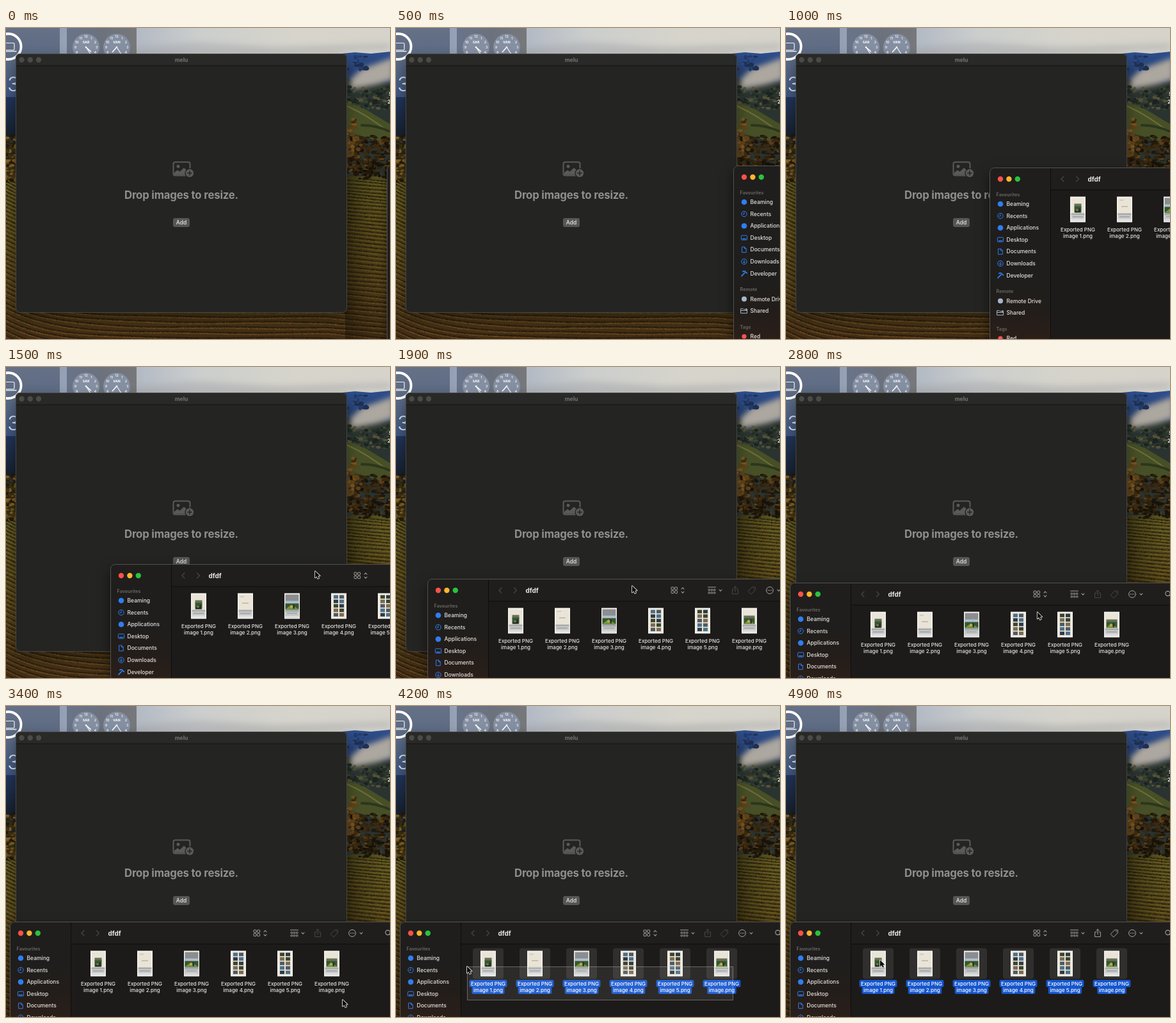
An HTML page with a canvas that plays this animation: 600x486 px, repeating every 5 s.

```html
<!DOCTYPE html>
<html lang="en">
<head>
<meta charset="utf-8">
<title>Image resizer</title>
<style>
  html, body { margin: 0; width: 100%; height: 100%; overflow: hidden; background: #242422; }
  canvas { display: block; width: 600px; height: 486px; }
</style>
</head>
<body>
<canvas id="stage" width="600" height="486"></canvas>
<script>
const W = 600, H = 486, LOOP = 5000, STEP = 100;
const FONT = 'Inter, "Liberation Sans", sans-serif';
const BLUE = '#2f7df5';
let g = document.getElementById('stage').getContext('2d');

let seed = 7;
const rnd = () => (seed = (seed * 16807) % 2147483647) / 2147483647;
const range = (a, b) => a + rnd() * (b - a);

function rect(x, y, w, h, r, fill, stroke, lw = 1) {
  g.beginPath();
  g.roundRect(x, y, w, h, r);
  if (fill) { g.fillStyle = fill; g.fill(); }
  if (stroke) { g.strokeStyle = stroke; g.lineWidth = lw; g.stroke(); }
}

function disc(x, y, r, fill, stroke, lw = 1) {
  g.beginPath();
  g.arc(x, y, r, 0, 7);
  if (fill) { g.fillStyle = fill; g.fill(); }
  if (stroke) { g.strokeStyle = stroke; g.lineWidth = lw; g.stroke(); }
}

function poly(pts, fill) {
  g.beginPath();
  pts.forEach(([x, y]) => g.lineTo(x, y));
  g.closePath();
  g.fillStyle = fill;
  g.fill();
}

function line(path, color, lw = 1, x = 0, y = 0) {
  g.save();
  g.translate(x, y);
  g.strokeStyle = color;
  g.lineWidth = lw;
  g.lineCap = g.lineJoin = 'round';
  g.stroke(new Path2D(path));
  g.restore();
}

function text(s, x, y, size, weight, color, align = 'left', spacing = 0) {
  g.font = `${weight} ${size}px ${FONT}`;
  g.textAlign = align;
  g.textBaseline = 'alphabetic';
  g.letterSpacing = spacing + 'px';
  g.fillStyle = color;
  g.fillText(s, x, y + size * 0.36);
}

function fade(x0, y0, x1, y1, ...stops) {
  const f = g.createLinearGradient(x0, y0, x1, y1);
  stops.forEach((c, i) => f.addColorStop(i / (stops.length - 1), c));
  return f;
}

// Monotone cubic through keys of the form [time, x, y]
function track(keys, t) {
  const last = keys.length - 1;
  if (t >= keys[last][0]) return keys[last].slice(1);
  let i = 0;
  while (t >= keys[i + 1][0]) i++;
  const slope = (k, c) => k < 0 || k >= last ? 0
    : (keys[k + 1][c] - keys[k][c]) / (keys[k + 1][0] - keys[k][0]);
  const tangent = (k, c) => {
    const a = slope(k - 1, c), b = slope(k, c);
    return a * b > 0 ? 2 * a * b / (a + b) : 0;
  };
  const d = keys[i + 1][0] - keys[i][0], u = (t - keys[i][0]) / d;
  return [1, 2].map(c =>
    keys[i][c] * (1 + 2 * u) * (1 - u) ** 2 + keys[i + 1][c] * u * u * (3 - 2 * u)
    + d * (tangent(i, c) * u * (1 - u) ** 2 + tangent(i + 1, c) * u * u * (u - 1)));
}

// ---- Desktop ----
function blobs(n, x0, y0, x1, y1, r, colors) {
  for (let i = 0; i < n; i++) {
    g.beginPath();
    g.ellipse(range(x0, x1), range(y0, y1), range(r / 2, r), range(r / 3, r * .7), 0, 0, 7);
    g.fillStyle = colors[Math.floor(rnd() * colors.length)];
    g.fill();
  }
}

function vineyard() {
  g.fillStyle = fade(0, 232, 0, H, '#57511f', '#554819', '#4e3c18', '#412c14');
  g.fillRect(0, 232, W, H - 232);
  for (let y = 200; y < H + 30; y += 4.6 + (y - 200) * .014) {
    const bend = x => y + 38 * (1 - Math.exp(-x / 70)) - 32
      + Math.max(0, x - 500) * .09 + Math.sin(x / 37 + y) * .7;
    for (let x = 0; x < W; x += 2) {
      const ry = bend(x);
      if (ry < 234 || (x > 20 && x < 530 && ry < 438)) continue;
      g.fillStyle = `rgba(28,20,9,${range(.35, .75)})`;
      g.fillRect(x, ry, 2, range(1.6, 2.8));
      const warm = (ry - 234) / 250;
      g.fillStyle = `rgba(${range(104, 146)},${range(98, 122) - warm * 22},38,${range(.3, .75)})`;
      g.fillRect(x, ry + range(2.4, 3.2), 2, 1.6);
    }
  }
  g.fillStyle = fade(530, 0, 585, 0, 'rgba(18,15,6,.45)', 'rgba(18,15,6,0)');
  g.fillRect(530, 232, 70, 254);
}

function mist(pts, color, blur) {
  g.save();
  g.filter = `blur(${blur}px)`;
  poly(pts, color);
  g.restore();
}

function clock(x, name, hour) {
  disc(x, 30, 21, '#8590a3');
  for (let n = 1; n <= 12; n++) {
    const a = n * Math.PI / 6;
    text(String(n), x + 16.6 * Math.sin(a), 30 - 16.6 * Math.cos(a), 5.4, 600, '#f4f5f7', 'center');
  }
  text(name, x, 22, 5.2, 700, '#fff', 'center');
  const hand = (turn, len, lw) =>
    line(`M0 0L${len * Math.sin(turn)} ${-len * Math.cos(turn)}`, '#fff', lw, x, 30);
  hand((hour + .4) * Math.PI / 6, 10, 1.6);
  hand(4.9 * Math.PI / 6, 16, 1.1);
  disc(x, 30, 1.3, '#fff');
}

function desktop() {
  g.fillStyle = fade(0, 0, W, 0, '#7f8ca4', '#a4aebf', '#cccecd', '#d6d4cb', '#d6d3ca');
  g.fillRect(0, 0, W, 240);
  mist([[200, 30], [300, 22], [420, 30], [600, 24], [600, 34], [420, 40], [200, 42]], 'rgba(168,170,174,.5)', 5);

  g.fillStyle = fade(0, 100, 0, 240, '#22375f', '#161f2c', '#3a2c14');
  g.fillRect(0, 90, 20, 150);
  poly([[525, 40], [545, 38], [570, 40], [600, 37], [600, 240], [525, 240]],
    fade(0, 38, 0, 90, '#2d4e8c', '#24385f'));
  poly([[525, 76], [550, 84], [600, 84], [600, 240], [525, 240]], '#2a3330');
  mist([[538, 80], [556, 64], [578, 56], [605, 46], [605, 80], [580, 88], [560, 92], [538, 96]], '#aca79f', 4);
  blobs(25, 533, 42, 565, 66, 5, ['#223a6a', '#2c4a80', '#1f2f50']);
  blobs(100, 533, 92, 602, 126, 4, ['#212b22', '#3a4430', '#565238', '#1a231f']);
  poly([[525, 114], [560, 126], [600, 150], [600, 182], [525, 160]], '#464f26');
  line('M533 122Q565 136 600 164', '#6b6c38', 2);
  line('M556 152Q580 152 600 162', '#2c361c', 4);
  vineyard();
  blobs(260, 530, 168, 604, 229, 4.5, ['#21170a', '#3b2810', '#5e3f17', '#2c230f', '#191208']);
  blobs(60, 530, 142, 552, 205, 4.5, ['#5e4218', '#3b2b12', '#7a5520']);
  blobs(36, 530, 218, 604, 236, 4, ['#171106', '#221a0a']);
  blobs(110, -3, 168, 18, 240, 4, ['#74521b', '#453213', '#846022', '#231a0c', '#36300f']);

  text('S', 598, 103, 8, 600, '#fff');
  text('2', 596, 115, 8, 600, '#fff');

  rect(-40, -30, 124, 138, 12, fade(0, 0, 0, 108, '#667186', '#596983', '#3d547f'));
  disc(3.6, 29, 20, null, '#fff', 3.8);
  rect(-6, 23.5, 19, 11, 1.5, null, '#f1f3f6', 1.2);
  line('M-8 36.5H16', '#f1f3f6', 1.4);
  text('63%', -16.5, 88, 31, 300, '#dde6f3');

  rect(95, -30, 109, 138, 12, fade(95, 0, 204, 0, '#69748a', '#6c727d', '#77787a'));
  clock(125, 'SAR', 4);
  clock(173, 'VAN', 7);
}

// ---- Resizer window ----
function frame(x, y, w, h, fill, shadow) {
  g.save();
  g.shadowColor = `rgba(0,0,0,${shadow})`;
  g.shadowBlur = 20;
  g.shadowOffsetY = 9;
  rect(x, y, w, h, 7, fill);
  g.restore();
}

function resizer() {
  frame(15, 40, 518, 405, '#242422', .35);
  rect(15, 40, 518, 19, [7, 7, 0, 0], '#292927');
  g.fillStyle = '#141413';
  g.fillRect(15, 58.5, 518, 1);
  rect(15.5, 40.5, 517, 404, 7, null, '#454543');
  [24.5, 37.8, 51].forEach(x => disc(x, 49.7, 4.2, '#4a4a49'));
  text('melu', 274, 49.5, 8.6, 700, '#747472', 'center');

  const tone = '#5a5a59';
  rect(261.5, 209.5, 26, 21, 3, null, tone, 2);
  disc(269, 216.3, 2.5, tone);
  poly([[263, 229.5], [263, 226], [268, 222], [271.5, 224.5], [278, 218.5], [286, 225], [286, 229.5]], tone);
  disc(287, 226.8, 7.6, '#242422');
  disc(287, 226.8, 6.2, tone);
  line('M283.8 226.8H290.2M287 223.6V230', '#242422', 1.5);

  text('Drop images to resize.', 274, 261, 16.8, 700, '#8f8f8d', 'center', -.2);
  rect(261, 297, 26, 14, 3.2, '#565655');
  text('Add', 274, 304.1, 8.5, 500, '#e9e9e8', 'center');
}

// ---- File browser ----
const places = [
  ['Beaming', () => disc(0, 0, 4.3, BLUE)],
  ['Recents', () => { disc(0, 0, 4.2, null, BLUE); line('M0 -2.4V.4H-2', BLUE); }],
  ['Applications', () => disc(0, 0, 4.3, BLUE)],
  ['Desktop', () => { rect(-4.6, -3.6, 9.2, 7, 1.2, null, BLUE); rect(-3, 1, 6, 1.4, .5, BLUE); }],
  ['Documents', () => line('M-3 -4.3H.6L3.2 -1.6V4.3H-3ZM.6 -4.3V-1.6H3.2', BLUE)],
  ['Downloads', () => { disc(0, 0, 4.2, null, BLUE); line('M0 -2.2V2M-1.8 .4L0 2.2L1.8 .4', BLUE); }],
  ['Developer', () => { line('M-4 4L1 -1.2', BLUE, 1.7); line('M-2 -3.2Q1 -4.6 2.6 -2L4.4 -.4', BLUE, 1.8); }],
];
const remote = [
  ['Remote Drive', () => disc(0, 0, 4, '#a5b7cb')],
  ['Shared', () => {
    line('M-5 -3.4H-1.6L-.6 -2.4H4.6V3.6H-5ZM-5 -.6H4.6', '#a5b7cb');
    disc(3.4, -2.6, 1.2, '#a5b7cb');
  }],
];

function row([label, icon], y) {
  g.save();
  g.translate(17, y);
  icon();
  g.restore();
  text(label, 26.5, y, 8.5, 500, '#e4e2e0');
}

function thumb(x, y, i) {
  const box = (dx, dy, w, h, c) => { g.fillStyle = c; g.fillRect(x + dx, y + dy, w, h); };
  box(-12, -20, 24, 40, '#f3f3f1');
  box(-10.5, -18, 21, 36, i === 2 ? '#8c8d8f' : '#e9e4d6');
  if (i === 3 || i === 4) {
    const tones = ['#4d5a63', '#2f3b46', '#7c6a54', '#49708f', '#39452e'];
    for (let r = 0; r < 5; r++)
      for (let c = 0; c < 2; c++)
        box(-8 + c * 9, -17 + r * 7, 7, 5.4, tones[(r * 3 + c * 2 + i) % 5]);
    return;
  }
  box(-10.5, 6, 21, 3, '#a8aaab');
  box(-10.5, 9, 21, 6, '#c7c9ca');
  box(-8, 11, 16, 1, '#888b8e');
  box(-10.5, 15, 21, 3, '#dedfdf');
  if (i === 1) {
    box(-5, -5, 10, 1, '#a39d90');
    box(-8, -15, 6, 1, '#bcb6a8');
    return;
  }
  const wide = i === 2 ? 10.5 : i === 5 ? 8.5 : 5.5;
  const top = i === 0 ? -9 : -8;
  box(-wide, top, wide * 2, 5, i === 2 ? '#aebfd0' : '#66705a');
  box(-wide, top + 4, wide * 2, 9, '#36572f');
  poly([[x - wide, y + 5], [x - 1, y - 2], [x + wide, y + 5]], i === 0 ? '#20271d' : '#6f9a3c');
  disc(x - 1, y + 1, 2, i === 0 ? '#6d7b45' : '#d8a13c');
  box(1.5, -2, 2.5, 6, '#26303a');
}

function file(i, picked) {
  const x = 138 + 73 * i, lines = ['Exported PNG', i < 5 ? `image ${i + 1}.png` : 'image.png'];
  if (picked) rect(x - 24, 40.5, 48, 48, 4, '#302f2d');
  thumb(x, 64.5, i);
  lines.forEach((s, k) => {
    const y = 95.7 + k * 10.6;
    if (picked) {
      g.font = `500 8px ${FONT}`;
      g.letterSpacing = '0px';
      const w = g.measureText(s).width + 5;
      rect(x - w / 2, y - 5.6, w, 11.2, 2.5, '#1556ce');
    }
    text(s, x, y, 8, 500, picked ? '#fff' : '#e6e5e3', 'center');
  });
}

function toolbar(active) {
  const on = '#a3a19f', off = '#484745', act = active ? on : off;
  line('M2 -4L-2 0L2 4', off, 1.1, 114, 17);
  line('M-2 -4L2 0L-2 4', off, 1.1, 137.5, 17);
  text('dfdf', 153.5, 17, 10, 700, '#e9e8e6');
  for (const dx of [0, 5.6])
    for (const dy of [0, 5.6]) rect(381 + dx, 12 + dy, 4, 4, .8, null, on);
  line('M-2 -2L0 -4.2L2 -2M-2 2L0 4.2L2 2', on, 1.1, 399, 17);
  for (let c = 0; c < 3; c++) {
    rect(439 + c * 4.2, 15.2, 2.6, 2.2, .4, null, on, .9);
    rect(439 + c * 4.2, 19.8, 2.6, 2.2, .4, null, on, .9);
  }
  line('M438.5 12H450.5', on);
  for (const x of [458, 549]) line('M-2 -1L0 1.2L2 -1', on, 1.1, x, 17);
  line('M-2 -1.8H-4.4V5.6H4.4V-1.8H2M0 2V-6M-2.2 -4L0 -6.2L2.2 -4', act, 1, 481, 17);
  line('M-5.6 1.2L.4 -5L4.6 -5.2Q5.6 -5 5.6 -4L5 0L-1 5.8Z', act, 1, 507, 17);
  disc(510.2, 14, .8, act);
  disc(535, 17, 5.4, null, on);
  [-2.5, 0, 2.5].forEach(d => disc(535 + d, 17, .8, on));
  disc(590.5, 16, 3.6, null, on, 1.1);
  line('M593.3 18.8L596 21.5', on, 1.2);
}

function browser(x, y, picked, active) {
  frame(x, y - 1, 660, 341, '#1d1b19', .5);
  g.save();
  g.translate(x, y);
  g.beginPath();
  g.roundRect(0, -1, 660, 341, 7);
  g.clip();
  g.fillStyle = fade(0, 400 - y, 0, H - y, '#1f1e1c', '#221d1a', '#2b1f19');
  g.fillRect(0, -1, 95, 341);
  g.fillStyle = '#201e1c';
  g.fillRect(96, -1, 564, 35);
  g.fillStyle = '#0e0d0c';
  g.fillRect(95, -1, 1, 341);
  g.fillRect(96, 33.5, 564, 1);

  ['#fe5148', '#fdb52f', '#28c33d'].forEach((c, i) => disc(17 + 13.4 * i, 17, 4.2, c));
  const head = (s, ty) => text(s, 10.5, ty, 7.3, 600, '#6c6966');
  head('Favourites', 41.5);
  places.forEach((p, i) => row(p, 56 + 18.6 * i));
  head('Remote', 192.7);
  remote.forEach((p, i) => row(p, 207.5 + 18.6 * i));
  head('Tags', 251);
  row(['Red', () => disc(0, 0, 3.6, '#ff5257')], 266);

  toolbar(active);
  for (let i = 0; i < 6; i++) file(i, picked(i));
  g.restore();
  rect(x + .5, y - .5, 659, 340, 7, null, '#535250');
}

function pointer(x, y) {
  g.save();
  g.translate(x, y);
  const p = new Path2D('M0 0V10.4L2.5 8.2L4.1 11.8L6 11L4.4 7.4H7.6Z');
  g.lineWidth = 1.6;
  g.lineJoin = 'round';
  g.strokeStyle = '#f4f4f4';
  g.stroke(p);
  g.fillStyle = '#0a0a0a';
  g.fill(p);
  g.restore();
}

// ---- Timeline ----
const windowKeys = [[0, 595, 215], [200, 593, 215], [1000, 318, 219], [1500, 163, 309],
  [2200, 6, 339], [2300, 6, 339], [2500, 6, 338]];
const pointerKeys = [[2200, 326, 349], [2300, 331, 348], [2500, 331, 348], [3300, 526, 459],
  [3500, 526, 459], [4200, 111, 407], [4400, 111, 407], [4900, 147, 397]];
const PRESS = 3500, RELEASE = 4300, anchor = [526, 459];

const backdrop = document.createElement('canvas');
backdrop.width = W;
backdrop.height = H;
const screen = g;
function paintBackdrop() {
  g = backdrop.getContext('2d');
  desktop();
  resizer();
  g = screen;
}

function draw(t) {
  const [wx, wy] = track(windowKeys, t).map(Math.round);
  const [px, py] = t < 2200 ? [wx + 320, wy + 10] : track(pointerKeys, t);
  const dragging = t > PRESS && t < RELEASE;
  const picked = i => t >= RELEASE
    || (dragging && px <= wx + 138 + 73 * i + 26 && py <= wy + 111);

  g.drawImage(backdrop, 0, 0);
  browser(wx, wy, picked, t >= RELEASE);
  if (dragging)
    rect(px + .5, py + .5, anchor[0] - px, anchor[1] - py, 0,
      'rgba(255,255,255,.07)', 'rgba(205,205,205,.4)');
  pointer(px, py);
}

paintBackdrop();
const start = performance.now();
function tick() {
  const t = (performance.now() - start) % LOOP;
  draw(Math.floor(t / STEP) * STEP);
  requestAnimationFrame(tick);
}
tick();
</script>
</body>
</html>
```
